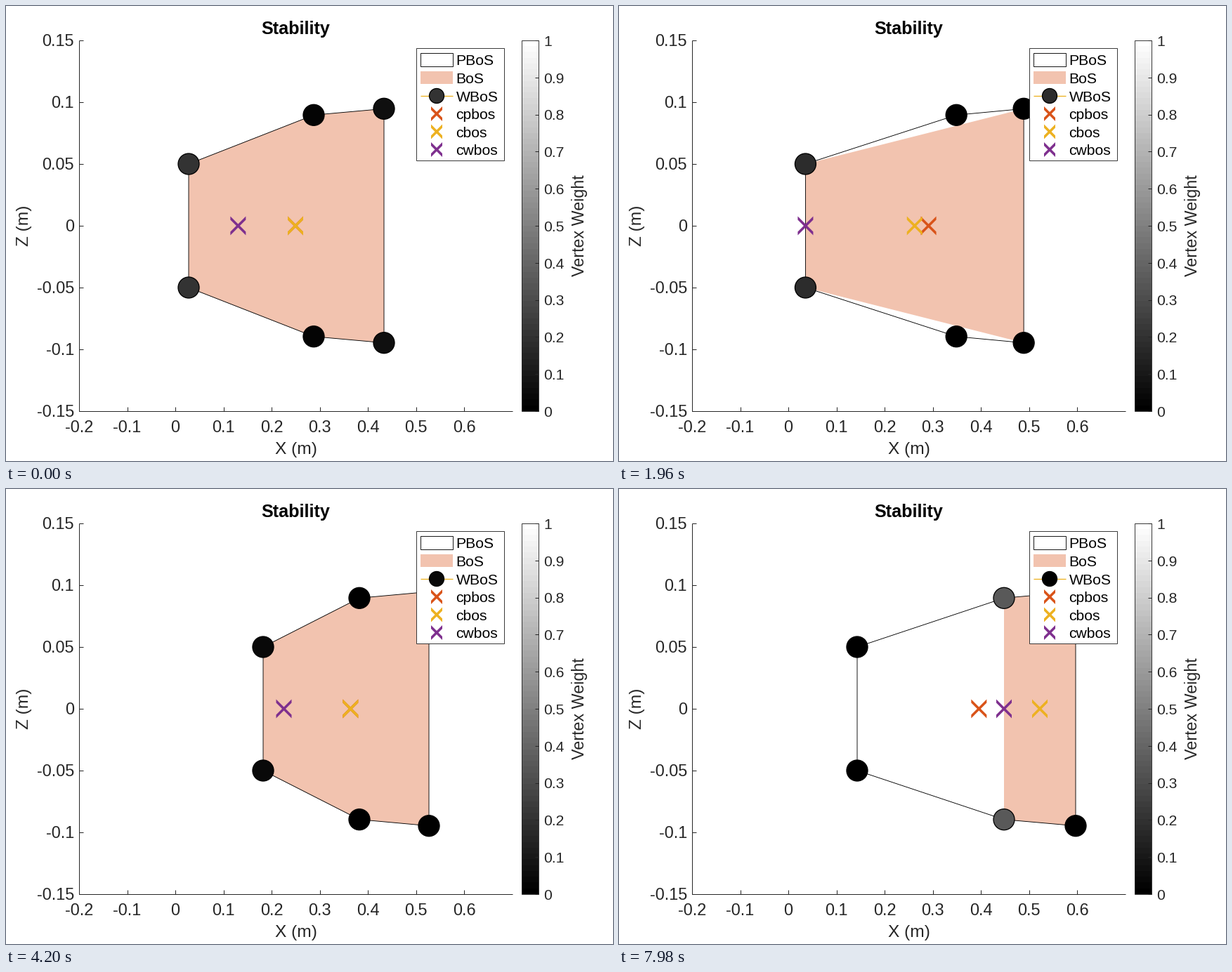
A matplotlib script that plays this animation: 864 by 648 pixels, repeating every 8 s.

```python
import numpy as np
import matplotlib.pyplot as plt
from matplotlib.animation import FuncAnimation
from matplotlib.patches import Circle, Polygon, Rectangle

W, H, DPI = 864, 648, 100
INTERVAL, FRAMES, HOLD = 20, 400, 7   # a new pose every HOLD frames
PX = 72 / DPI

INK = "#262626"
ORANGE, YELLOW, PURPLE = "#D95319", "#EDB120", "#7E2F8E"
PINK = "#F2C3AF"

plt.rcParams["font.family"] = "Liberation Sans"
fig = plt.figure(figsize=(W / DPI, H / DPI), dpi=DPI, facecolor="white")
ax = fig.add_axes([0, 0, 1, 1])
ax.set_xlim(0, W)
ax.set_ylim(H, 0)
ax.axis("off")


def line(xs, ys, color=INK, width=1.0, z=1):
    return ax.plot(xs, ys, color=color, lw=width * PX, zorder=z,
                   solid_capstyle="butt")[0]


def text(x, y, s, size, ha="left", color=INK, z=1, **kw):
    return ax.text(x, y, s, fontsize=size * PX, ha=ha, va="baseline",
                   color=color, zorder=z, **kw)


def box(x0, y0, x1, y1, face="none", edge="none", z=1):
    return ax.add_patch(Rectangle((x0, y0), x1 - x0, y1 - y0, fc=face, ec=edge,
                                  lw=0.9 * PX, zorder=z))


def disc(x, y, r, z):
    return ax.add_patch(Circle((x, y), r, fc="black", ec="black",
                               lw=1.3 * PX, zorder=z))


def cross_shape(x, y, r, d=2.5):
    """X mark whose arms are cut off vertically at x +/- r."""
    arm = np.array([(d, 0), (r, r - d), (r, r + d), (0, d)])
    quarter = [arm, arm[::-1] * (-1, 1), -arm, arm[::-1] * (1, -1)]
    return np.vstack(quarter) + (x, y)


def cross(x, y, r, color, z):
    return ax.add_patch(Polygon(cross_shape(x, y, r), fc=color, ec="none",
                                zorder=z))


def smooth(t, keys, values):
    """Monotone cubic interpolation through the keys."""
    k, v = np.array(keys, float), np.array(values, float)
    h = np.diff(k)
    s = np.diff(v) / h
    m = np.r_[s[0], np.zeros(len(s) - 1), s[-1]]
    for j in range(1, len(s)):
        if s[j - 1] * s[j] > 0:
            m[j] = 2 * s[j - 1] * s[j] / (s[j - 1] + s[j])
    i = min(np.searchsorted(k, t, side="right") - 1, len(h) - 1)
    u = (t - k[i]) / h[i]
    return ((1 + 2 * u) * (1 - u) ** 2 * v[i] + u * u * (3 - 2 * u) * v[i + 1]
            + h[i] * u * (1 - u) * ((1 - u) * m[i] - u * m[i + 1]))


# Axes
LEFT, RIGHT, TOP, BOTTOM, MID = 104, 721, 49, 577, 313
line([LEFT, LEFT, RIGHT], [TOP, BOTTOM, BOTTOM])
for n in range(9):
    x = LEFT + 68.5 * n
    line([x, x], [BOTTOM, BOTTOM - 6])
    text(x, 607, f"{(n - 2) / 10:g}", 23.5, "center")
for n in range(7):
    y = TOP + 88 * n
    line([LEFT, LEFT + 6], [y, y])
    text(97, y + 8.3, f"{(3 - n) * 0.05:.2g}", 23.5, "right")
text(412.5, 40, "Stability", 25.2, "center", "black", weight="bold")
text(412.5, 638, "X (m)", 24.5, "center")
text(32, MID, "Z (m)", 24.5, "center", rotation=90, rotation_mode="anchor")

# Colour bar
ax.imshow(np.linspace(1, 0, 64)[:, None], cmap="gray", vmin=0, vmax=1,
          extent=(734, 758, BOTTOM, TOP), interpolation="nearest",
          aspect="auto", zorder=1)
ax.set_xlim(0, W)
ax.set_ylim(H, 0)
box(734, TOP, 758, BOTTOM, edge=INK, z=2)
for n in range(11):
    y = BOTTOM - 52.8 * n
    line([753, 758], [y, y], z=2)
    text(765.5, y + 7.7, f"{n / 10:g}", 21.2)
text(823, MID, "Vertex Weight", 23.2, "center", rotation=90,
     rotation_mode="anchor")

# Legend
box(584, 60, 709, 219.5, "white", INK, z=20)
for n, name in enumerate(["PBoS", "BoS", "WBoS", "cpbos", "cbos", "cwbos"]):
    text(640.5, 84.5 + 25.55 * n, name, 21.2, color="black", z=21)
box(590, 67, 636, 86, "white", "black", z=21)
key_fill = box(589.5, 92.5, 636, 111, PINK, z=21)
key_line = line([590, 636], [102, 102], "#E39A90", z=21)
line([590, 636], [128, 128], YELLOW, 1.3, z=21)
key_disc = disc(613, 128, 10.5, 22)
for n, color in enumerate([ORANGE, YELLOW, PURPLE]):
    cross(613, 153.5 + 25.5 * n, 8, color, 22)

# Moving parts: heel, middle and toe vertices, mirrored about MID
HALF = np.array([88, 157.7, 166.7])
POSITION = [
    ([0, 8, 10, 16, 19, 25, 30, 37, 46, 50, 56, 57],
     [260, 257, 255.5, 274.5, 301, 346, 366, 367.5, 370, 365, 342, 339]),
    ([0, 8, 19, 30, 37, 46, 57], [438, 464, 490.5, 503, 544, 547, 548]),
    ([0, 8, 19, 30, 37, 46, 57], [538, 565, 584, 602, 644, 648, 650]),
]
WEIGHT = [
    ([0, 8, 19, 30, 35, 57], [.2, .2, .13, .035, 0, 0]),
    ([0, 6, 30, 37, 46, 57], [.015, 0, 0, .036, .225, .35]),
    ([0, 7, 27, 30, 37, 46, 52, 57], [.06, 0, 0, .005, .115, .0127, 0, 0]),
]
# First step of each phase and which vertices touch the ground
CONTACT = [(0, (0, 1, 2)), (5, (0, 2)), (17, (0,)), (26, (0, 1, 2)),
           (33, (1, 2))]

base = ax.add_patch(Polygon([(0, 0)] * 3, fc=PINK, ec="none", zorder=3))
outline = line([], [], "black", 0.9, z=4)
heel_line = line([], [], "#EBA447", 1.2, z=5)
discs = [[disc(0, MID + side * h, 15, 6) for side in (-1, 1)] for h in HALF]
marks = [cross(0, MID, 11, c, 7 + n)
         for n, c in enumerate([ORANGE, YELLOW, PURPLE])]


def ring(xs, half):
    """Closed corner list of the shape mirrored about MID."""
    upper = np.column_stack([xs, MID - half])
    lower = np.column_stack([xs, MID + half])[::-1]
    return np.vstack([upper, lower, upper[:1]])


def draw(i):
    step = i // HOLD
    x = np.array([smooth(step, *p) for p in POSITION])
    w = np.clip([smooth(step, *p) for p in WEIGHT], 0, 1)
    touch = list([c for start, c in CONTACT if start <= step][-1])
    single = len(touch) == 1

    outline.set_data(*ring(x, HALF).T)
    base.set_xy(ring(x[touch], HALF[touch]))
    base.set_visible(not single)
    heel_line.set_data([x[0], x[0]], [MID - HALF[0], MID + HALF[0]])
    heel_line.set_visible(single)
    key_fill.set_visible(not single)
    key_line.set_visible(single)

    for pair, px, g in zip(discs, x, w):
        for d in pair:
            d.center = (px, d.center[1])
            d.set_facecolor((g, g, g))
    key_disc.set_facecolor((w[0],) * 3)

    centres = [x.mean(), x[touch].mean(), (x * w).sum() / w.sum()]
    for mark, cx in zip(marks, centres):
        mark.set_xy(cross_shape(cx, MID, 11))
    return []


anim = FuncAnimation(fig, draw, frames=FRAMES, interval=INTERVAL,
                     repeat=True, repeat_delay=0, blit=False,
                     cache_frame_data=False)
plt.show()
```
